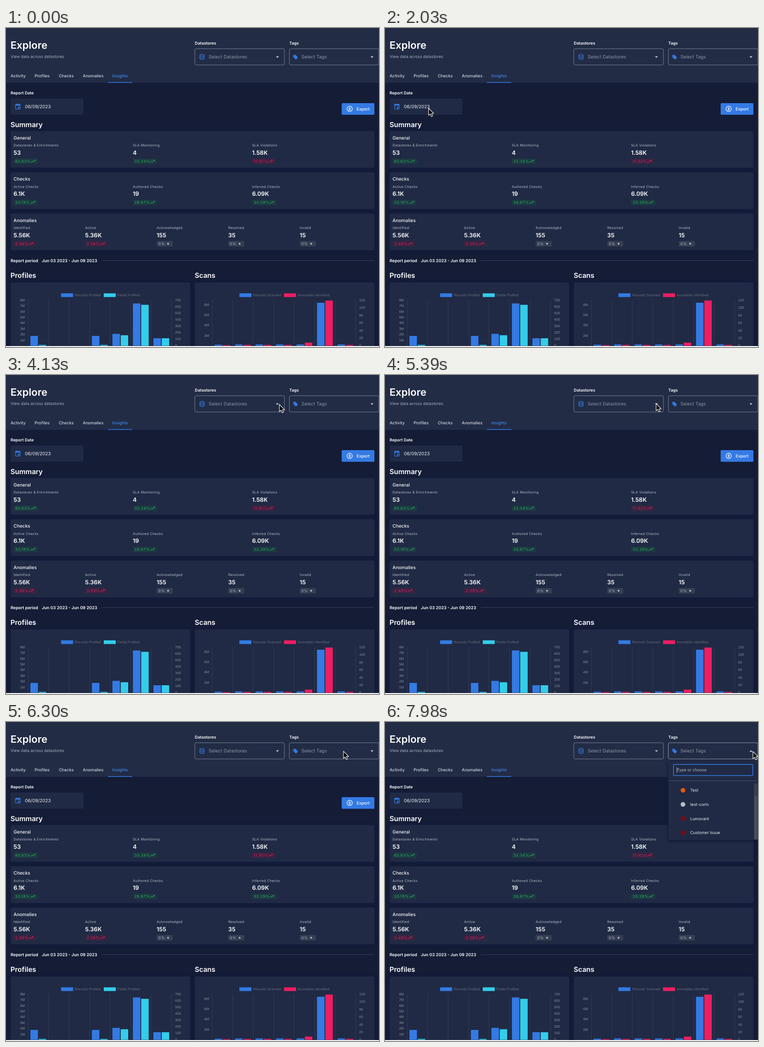
These frames come from a looping animation (809x692 px, 8 s). An HTML page:

```html
<!DOCTYPE html>
<html lang="en">
<head>
<meta charset="utf-8">
<title>Explore insights</title>
<style>
  html, body { margin: 0; width: 100%; height: 100%; overflow: hidden; background: #141c36; }
  svg { display: block; width: 809px; height: 692px; font-family: Inter, sans-serif; text-rendering: geometricPrecision; }
  .card { fill: #202a44; filter: drop-shadow(0 1px 3px #101b42); }
  .title { font-size: 15.1px; font-weight: 600; fill: #fff; }
  .strong { font-size: 8.8px; font-weight: 600; fill: #fff; }
  .period { font-size: 9.05px; font-weight: 600; fill: #fff; }
  .tab { font-size: 9px; font-weight: 500; fill: #d0d4dd; }
  .field { font-size: 10.05px; fill: #8d94a5; }
  .heading { font-size: 10.05px; font-weight: 500; fill: #f4f5f8; }
  .label { font-size: 7.54px; letter-spacing: .26px; fill: #b3b8c6; }
  .value { font-size: 12.6px; font-weight: 600; fill: #fff; }
  .chip { font-size: 7.9px; letter-spacing: .8px; }
  .item { font-size: 8.75px; fill: #eceef3; }
  .axis, .legend { font: 7.65px "Liberation Sans", Arial, sans-serif; fill: #868b99; }
  .legend { fill: #666b7a; }
</style>
</head>
<body>
<svg id="stage" viewBox="0 0 809 692"></svg>
<script>
const LOOP = 8000, MENU_OPENS = 7500;
const BLUE = '#347ae4', CYAN = '#33cdea', PINK = '#ee1e61';
const stage = document.getElementById('stage');

function add(tag, attrs, parent = stage, content = '') {
  const node = document.createElementNS('http://www.w3.org/2000/svg', tag);
  for (const name in attrs) node.setAttribute(name, attrs[name]);
  node.textContent = content;
  return parent.appendChild(node);
}
const rect = (x, y, width, height, fill, extra = {}, parent) =>
  add('rect', { x, y, width, height, fill, ...extra }, parent);
const text = (content, x, y, cls, extra = {}, parent) =>
  add('text', { x, y, class: cls, ...extra }, parent, content);
const path = (d, extra = {}, parent) => add('path', { d, ...extra }, parent);
const card = (x, y, width, height) => rect(x, y, width, height, '', { class: 'card', rx: 4 });
const outline = { fill: 'none', stroke: BLUE, 'stroke-width': 1.2 };

function drawHeader() {
  rect(0, 0, 809, 119, '#222c45');
  text('Explore', 9.7, 45, '', { 'font-size': 22, 'font-weight': 600, fill: '#fff' });
  text('View data across datastores', 10, 64.5, '', { 'font-size': 8.7, fill: '#a9afbd' });
  [['Activity', 10], ['Profiles', 62], ['Checks', 114.5], ['Anomalies', 166.5], ['Insights', 230.5]]
    .forEach(([name, x]) => text(name, x, 106.7, 'tab', name === 'Insights' ? { style: 'fill:#4285ea' } : {}));
  rect(221, 117.5, 53, 1.5, BLUE);

  const select = (x, name, prompt, promptX) => {
    text(name, x, 36.2, 'strong');
    const box = rect(x, 45, 194.3, 35.2, 'none', { rx: 3, stroke: '#7b8294' });
    text(prompt, promptX, 66.4, 'field');
    return box;
  };
  select(409.6, 'Datastores', 'Select Datastores', 439.5);
  const tagBox = select(614.6, 'Tags', 'Select Tags', 640.7);
  path('M420.5 59.2a4.6 2 0 0 1 9.2 0v7a4.6 2 0 0 1-9.2 0zM420.5 59.2a4.6 2 0 0 0 9.2 0M420.5 62.8a4.6 2 0 0 0 9.2 0', outline);
  path('M623 58h4.6l5.2 5.2q.6.7 0 1.4l-3.3 3.3q-.7.6-1.4 0l-5.2-5.2v-4.6zm1.7 1.2a.8.8 0 1 0 .01 0z',
    { fill: BLUE, 'fill-rule': 'evenodd' });
  path('M585.4 61.4h6.6l-3.3 3.4z', { fill: '#d3d6de' });
  const tagArrow = path('M-3.3-1.6h6.6l-3.3 3.4z', { fill: '#d3d6de' });
  return { tagBox, tagArrow };
}

function drawToolbar() {
  text('Report Date', 10, 144.2, 'strong');
  rect(10, 153, 158, 35, '#202a44', { rx: 3 });
  rect(20.6, 165.6, 10.2, 10.2, 'none', { rx: 1, stroke: BLUE, 'stroke-width': 1.2 });
  rect(20.6, 165.4, 10.2, 3, BLUE);
  rect(22.3, 163.8, 1.3, 2.5, BLUE);
  rect(27.8, 163.8, 1.3, 2.5, BLUE);
  rect(26, 171, 3.2, 3.2, BLUE);
  text('06/09/2023', 41, 174.2, 'field', { style: 'fill:#eef0f5;font-size:9.9px' });
  rect(728, 163, 71, 25.2, BLUE, { rx: 2 });
  const white = { ...outline, stroke: '#fff' };
  add('circle', { cx: 745.4, cy: 175.5, r: 5.8, ...white });
  path('M745.4 171.8v4.5m-2.4-2l2.4 2.4 2.4-2.4M742.7 178.5h5.4', white);
  text('Export', 760.5, 178.7, 'tab', { style: 'fill:#fff' });
}

const TONES = {
  up: ['#1d3843', '#29b257'],
  bad: ['#3a2441', '#d81f5d'],
  flat: ['#363e54', '#b4b9c6']
};

function drawStat(x, y, [label, value, change, tone, width]) {
  const [back, ink] = TONES[tone];
  text(label, x, y + 33.5, 'label');
  text(value, x, y + 51, 'value');
  rect(x, y + 59.5, width, 12, back, { rx: 2 });
  text(change, x + 3.7, y + 68.3, 'chip', { fill: ink });
  if (tone === 'flat') add('circle', { cx: x + 24.8, cy: y + 65.5, r: 2, fill: ink });
  else path('M16 6l2.29 2.29-4.88 4.88-4-4L2 16.59 3.41 18l6-6 4 4 6.3-6.29L22 12V6z',
    { fill: ink, transform: `translate(${x + width - 16.5} ${y + 59.6}) scale(.5)` });
}

function drawSummary() {
  text('Summary', 9.7, 214.5, 'title');
  const groups = [
    ['General', 258.7, [
      ['Datastores & Enrichments', '53', '65.63%', 'up', 53],
      ['SLA Monitoring', '4', '33.34%', 'up', 53],
      ['SLA Violations', '1.58K', '11.92%', 'bad', 50]]],
    ['Checks', 258.7, [
      ['Active Checks', '6.1K', '33.19%', 'up', 52],
      ['Authored Checks', '19', '26.67%', 'up', 52.5],
      ['Inferred Checks', '6.09K', '33.29%', 'up', 53]]],
    ['Anomalies', 155.2, [
      ['Identified', '5.56K', '2.49%', 'bad', 48],
      ['Active', '5.36K', '2.59%', 'bad', 48],
      ['Acknowledged', '155', '0%', 'flat', 35],
      ['Resolved', '35', '0%', 'flat', 35],
      ['Invalid', '15', '0%', 'flat', 35]]]
  ];
  groups.forEach(([name, step, stats], row) => {
    const y = 223.5 + row * 89.5;
    card(10, y, 789, 79.7);
    text(name, 16.3, y + 18.2, 'heading');
    stats.forEach((stat, i) => drawStat(16.3 + i * step, y, stat));
  });
  text('Report period', 10, 507.7, 'period');
  text('Jun 03 2023 - Jun 09 2023', 77.7, 507.7, 'period');
  rect(208, 504, 591, 1, '#39435e');
}

function drawChart({ title, x, plotX, legend, left, right, bars }) {
  const STEP = 44.45, BASE = 689.5;
  text(title, x - .3, 542, 'title');
  card(x, 552, 389.5, 160);
  legend.forEach(([name, boxX, color]) => {
    rect(boxX, 575.6, 26, 8, color);
    text(name, boxX + 29.6, 582.3, 'legend');
  });
  left.names.forEach((name, i) =>
    text(name, plotX - 7, left.y + i * left.gap + 2.7, 'axis', { 'text-anchor': 'end' }));
  right.names.forEach((name, i) => text(name, plotX + 318.7, 592.7 + i * right.gap, 'axis'));
  for (let i = 0; i < 8; i++) rect(plotX + i * STEP - .3, 590, .7, 100, '#3b445b');
  bars.forEach((heights, series) => heights.forEach((h, i) =>
    rect(plotX + 5 + i * STEP + series * 18, BASE - h, 16.2, h, legend[series][2])));
}

function drawCharts() {
  drawChart({
    title: 'Profiles', x: 10, plotX: 48,
    legend: [['Records Profiled', 119.5, BLUE], ['Fields Profiled', 212, CYAN]],
    left: { names: ['8M', '7M', '6M', '5M', '4M', '3M', '2M', '1M'], y: 590, gap: 12.4 },
    right: { names: [700, 600, 500, 400, 300, 200, 100, 0], gap: 14.1 },
    bars: [[21.5, 0, 0, 21.5, 26, 92, 16.5], [2, 0, 0, 2, 23, 89, 16.5]]
  });
  drawChart({
    title: 'Scans', x: 409.5, plotX: 447.3,
    legend: [['Records Scanned', 506.3, BLUE], ['Anomalies Identified', 603, PINK]],
    left: { names: ['8M', '6M', '4M', '2M'], y: 600.5, gap: 22.1 },
    right: { names: [120, 100, 80, 60, 40, 20, 0], gap: 16.45 },
    bars: [[2.5, 3, 3, 3, 3, 93.5, 3], [1.5, 2, 2, 2, 7, 98.3, 2]]
  });
  rect(0, 690, 809, 2, '#fff');
}

function drawMenu() {
  const menu = add('g', {});
  rect(614.5, 84, 194, 172, '#202a44', { rx: 2, style: 'filter:drop-shadow(0 2px 3px #0d1531)' }, menu);
  rect(625.6, 92, 172, 24.3, 'none', { rx: 2, stroke: BLUE, 'stroke-width': 1.5 }, menu);
  text('Type or choose', 633, 107.3, 'item', { style: 'fill:#b5bac6' }, menu);
  rect(614.5, 127, 194, 1, '#4a536b', {}, menu);
  [['Test', '#e65a10'], ['test-corin', '#b9bdc9'], ['Lumovant', '#780d10'], ['Customer Issue', '#780d10']]
    .forEach(([name, color], i) => {
      const y = 148.2 + i * 30.65;
      add('circle', { cx: 646.3, cy: y, r: 5, fill: color }, menu);
      text(name, 662, y + 3.1, 'item', {}, menu);
    });
  rect(800.5, 133, 7.8, 122, '#474e60', { rx: 2 }, menu);
  rect(800.5, 133, 7.8, 28, '#383f52', { rx: 2 }, menu);
  const caret = rect(632.8, 98.5, .8, 11.5, '#fff', {}, menu);
  return { menu, caret };
}

const { tagBox, tagArrow } = drawHeader();
drawToolbar();
drawSummary();
drawCharts();
const { menu, caret } = drawMenu();
const cursor = path('M0 0V15.6L3.6 12.4 6.1 18 8.8 16.8 6.4 11.3H11.2Z',
  { fill: '#050505', stroke: '#fff', 'stroke-width': 1.1, 'stroke-linejoin': 'round' });

// Pointer stops: time, x, y
const STOPS = [
  [300, 300, 702], [1120, 202, 122], [1900, 95, 172], [2700, 88, 200], [2800, 69, 200],
  [2940, 69, 200], [3010, 63, 201], [3750, 593, 64], [4130, 593, 64], [4450, 590, 63],
  [5250, 588, 62], [5800, 588, 62], [6600, 798, 64]
];

function pointerAt(t) {
  const next = STOPS.findIndex(stop => stop[0] > t);
  if (next === 0) return STOPS[0].slice(1);
  if (next < 0) return STOPS[STOPS.length - 1].slice(1);
  const [t0, x0, y0] = STOPS[next - 1], [t1, x1, y1] = STOPS[next];
  const u = (t - t0) / (t1 - t0), eased = u * u * (3 - 2 * u);
  return [x0 + (x1 - x0) * eased, y0 + (y1 - y0) * eased];
}

function render(now) {
  const t = now % LOOP, open = t >= MENU_OPENS;
  cursor.setAttribute('transform', `translate(${pointerAt(t)})`);
  menu.setAttribute('opacity', Math.min(1, Math.max(0, (t - MENU_OPENS) / 150)));
  caret.setAttribute('opacity', (t - MENU_OPENS) % 1000 < 500 ? 1 : 0);
  tagArrow.setAttribute('transform', `translate(793.8 63) scale(1 ${open ? -1 : 1})`);
  tagBox.setAttribute('stroke', open ? '#969dac' : '#7b8294');
}

const start = performance.now();
function tick() {
  render(performance.now() - start);
  requestAnimationFrame(tick);
}
tick();
</script>
</body>
</html>
```
